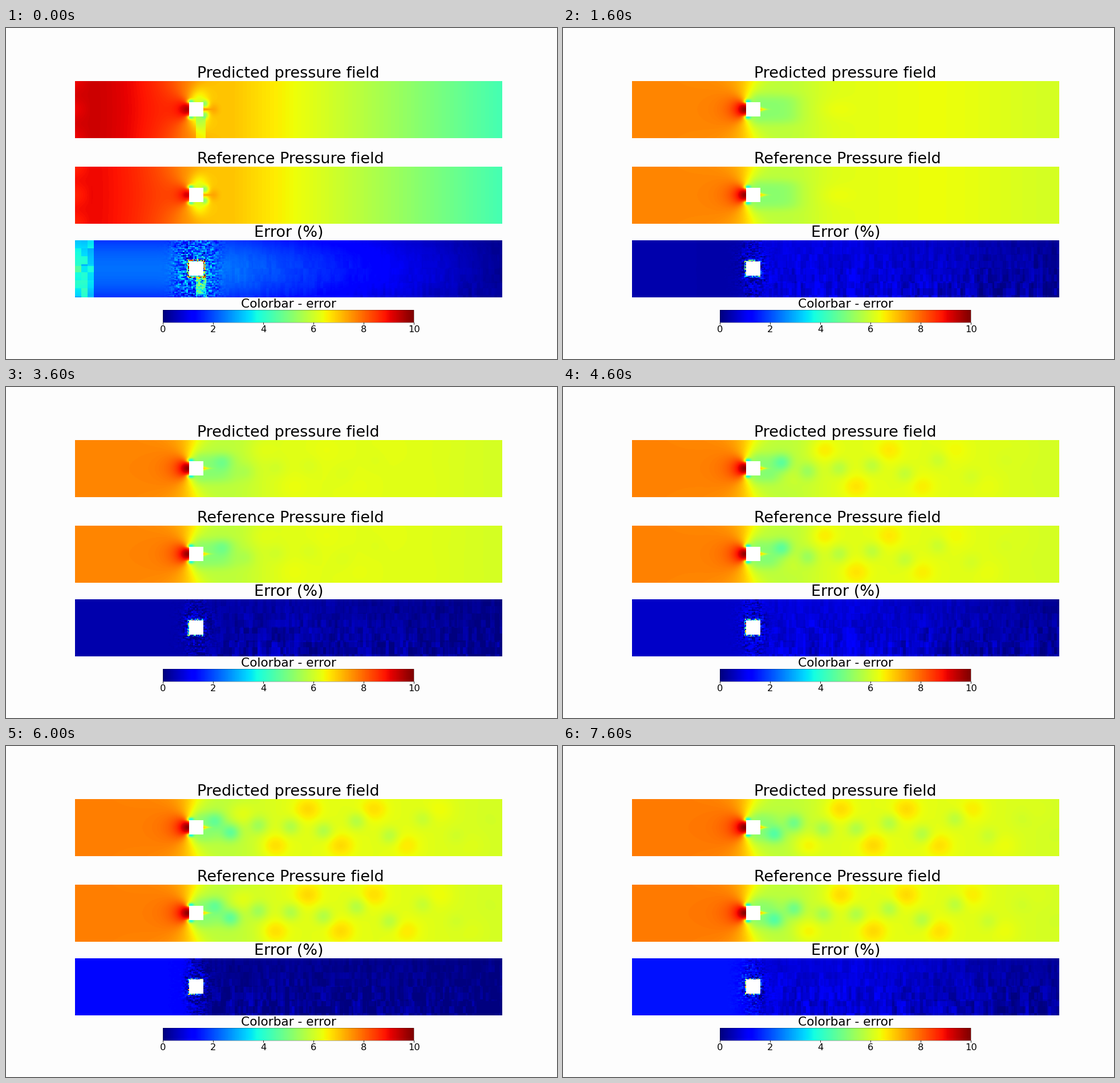
Recreate the animation shown at these times as a matplotlib script. Size 966 by 580 pixels, loop 8 s.

```python
import numpy as np
import matplotlib.pyplot as plt
from matplotlib.animation import FuncAnimation
from matplotlib.patches import Rectangle

W, H = 966, 580
LEFT, RIGHT, ROWS = 121, 870, 100
TOPS = (93, 243, 372)
STATES = 16
SPACING, STEP = 116, 63  # vortex spacing and drift per state

X, Y = np.meshgrid(np.arange(LEFT, RIGHT) + 0.5, np.arange(ROWS) + 0.5)
DY = Y - 49.5
D = abs(DY)
BOX = (X > 321) & (X < 346) & (D < 12.8)
WALL = np.maximum(abs(X - 333.5), D) - 12.5  # distance from the box


def sigmoid(z):
    return 1 / (1 + np.exp(-np.clip(z, -50, 50)))


def ramp(v, a, b):
    return np.clip((v - a) / (b - a), 0, 1)


def blob(x, dy, sx, sy):
    return np.exp(-((X - x) / sx) ** 2 - ((DY - dy) / sy) ** 2)


def startup(k):
    """Weight of the initial transient, gone after one state."""
    return np.exp(-4 * k)


def train(phase, k, first):
    """Positions of evenly spaced vortices drifting downstream."""
    return np.arange((phase + STEP * (k - 9) - first) % SPACING + first, 930, SPACING)


def shedding(k, x):
    """Vortex strength: grows with time, later further downstream."""
    return sigmoid(1.3 * (k - 7.4 - .35 * (x - 400) / STEP))


def vortices(k):
    out = np.zeros_like(X)
    for side in (-1, 1):
        # Low-pressure cores, held back while they form behind the box
        for x in train(629 - 29 * side, k, 305):
            xs = 360 + 30 * np.log1p(np.exp((x - 360) / 30))
            amp = .06 * sigmoid((740 - xs) / 40) + .05 * np.exp(-((xs - 390) / 25) ** 2)
            dy = side * np.clip((x - 485) * .085, -12, 15)
            out -= shedding(k, xs) * amp * ramp(x, 305, 330) * blob(xs, dy, 16, 15)
        # High-pressure saddles along the walls
        for x in train(485 + 29 * side, k, 395):
            amp = .055 * sigmoid((740 - x) / 50) * ramp(x, 385, 425)
            dy = side * min(32, 18 + (x - 405) * .7)
            out += shedding(k, x) * amp * blob(x, dy, 24, 21)
    return out


def pressure(k, predicted):
    start = startup(k)
    settled = 1 - start

    inlet = .765 + .013 * ((k - 3) / 12) ** 2 + start * (.165 if predicted else .135)
    drop = .012 + .11 * start
    up = inlet - drop * ramp(X, 150, 310) ** 1.6
    up -= start * .02 * ramp(X, 150, LEFT) * (1 + .5 * np.cos(DY / 8))

    decay = .70 - .268 * ramp(X, 400, RIGHT)
    steady = .575 + .05 * sigmoid((X - 440) / 20) - .02 * sigmoid((X - 790) / 30)
    surge = np.exp(-(k - 1) / 2) * np.exp(-((X - 455 - 65 * k) / 90) ** 2)
    down = start * decay + settled * (steady + .035 * surge)

    # Isolines fan out from the leading corners
    d = D - 12.5
    mid = 318 + np.where(d > 0, .27 * d, -3 * d)
    width = 6 + .6 * np.clip(d, 0, None)
    p = up + (down - up) * (.5 + .5 * np.tanh((X - mid) / width))

    # Stagnation on the front face, suction at its corners
    gap = np.clip(320 - X, 0, None)
    face = np.exp(-(DY / (11 + .45 * gap)) ** 2) / (1 + (gap / 17) ** 2)
    p += (.23 - .07 * start) * face * (X < 321)
    p -= .22 * np.exp(-(X - 324) ** 2 / 30 - (D - 14) ** 2 / 12)

    # Early flow round the box
    p -= start * .08 * np.exp(-((X - 338) / 16) ** 2 - (d / 22) ** 2)
    p -= start * .13 * np.exp(-((X - 349) / 6) ** 2 - ((D - 10) / 6) ** 2)
    p += start * .035 * blob(363, 0, 10, 10)
    if predicted:
        p -= start * .07 * ((X > 333) & (X < 350) & (DY > 12))

    # Wake bubble, the jet closing it, then the vortex street
    end = 410 - 35 * shedding(k, 400)
    wake = sigmoid((end - X) / 9) * sigmoid((X - 332) / 4) * np.exp(-(D / 25) ** 4)
    jet = np.exp(-.7 * (k - 1)) * blob(420 + 20 * k, 0, 30, 17)
    p += settled * (.06 * jet - .06 * wake + vortices(k))
    return np.ma.array(p, mask=BOX)


def cells(rng, cw, ch):
    """Centred uniform noise on cw by ch pixel cells."""
    rows, cols = X.shape
    grid = rng.random((-(-rows // ch), -(-cols // cw))) - .5
    return np.kron(grid, np.ones((ch, cw)))[:rows, :cols]


def error(k):
    rng = np.random.default_rng(40 + k)
    start = startup(k)

    # Inlet error creeps up, wake error pulses with the shedding
    inlet = .035 + .11 * sigmoid(k - 10)
    wake = .05 + .03 * np.cos(np.pi * (k - 9) / 3)
    level = inlet + (wake - inlet) * sigmoid((X - 325) / 10)
    kick = np.exp(-1.5 * (k - 1))
    level += kick * (.08 - .06 * np.exp(-((X - 310) / 35) ** 2))
    level *= 1 - .75 * ramp(X, 520, RIGHT)
    first = (.235 - .215 * ramp(X, 400, RIGHT)) * (1 - .25 * (DY / 50) ** 2)
    e = start * first + (1 - start) * level

    # Patchy inlet at first, streaks in the wake
    e += start * (X < 154) * (.11 + .05 * (DY > -5) + .12 * cells(rng, 11, 14))
    streak = (cells(rng, 8, 25) + cells(rng, 5, 12)) * (1 + DY / 80)
    e += .035 * streak * sigmoid((X - 350) / 12) * (1 - .7 * start)

    # Speckle around the box, hottest at its walls
    fine = cells(rng, 6, 2) + cells(rng, 3, 3)
    column = np.exp(-((X - 333) / (18 + 22 * start)) ** 4)
    e += fine * column * (.07 + .10 * start)
    e += .16 * fine * np.exp(-np.clip(WALL, 0, None) / 8)
    e += start * ((X > 333) & (X < 352) & (DY > 14)) * (.14 + .28 * cells(rng, 5, 19))
    hot = cells(rng, 2, 2) + .5
    e += (WALL < 2.5 + 2 * start) * (X < 346 + 6 * start) * (.65 + .2 * start) * hot ** 2
    return np.ma.array(np.clip(e, 0, 1), mask=BOX)


fields = [(pressure(k, True), pressure(k, False), error(k)) for k in range(STATES)]

fig = plt.figure(figsize=(W / 100, H / 100), dpi=100, facecolor="#fdfdfd")
ax = fig.add_axes([0, 0, 1, 1])
ax.axis("off")

cmap = plt.get_cmap("jet").copy()
cmap.set_bad("white")


def show(data, x0, x1, y0, y1):
    return ax.imshow(data, cmap=cmap, vmin=0, vmax=1, aspect="auto",
                     interpolation="nearest", extent=(x0, x1, y1, y0))


def label(x, y, text, px, ha="center"):
    ax.text(x, y, text, fontsize=px * .72, ha=ha, va="baseline",
            family="DejaVu Sans", color="black")


panels = [show(f, LEFT, RIGHT, top, top + ROWS) for f, top in zip(fields[0], TOPS)]
show(np.linspace(0, 1, 440)[None, :], 275, 715, 494, 516)
ax.add_patch(Rectangle((275, 494), 440, 22, fill=False, ec="black", lw=.5, alpha=.4))

label(335, 87, "Predicted pressure field", 27, "left")
label(335, 237, "Reference Pressure field", 27, "left")
label(495.3, 366, "Error (%)", 27)
label(495.3, 490, "Colorbar - error", 21.7)
for v in range(0, 11, 2):
    x = 275.3 + 44 * v
    ax.plot([x, x], [516, 519], color="black", lw=.6)
    label(x, 533, str(v), 16.3)

ax.set_xlim(0, W)
ax.set_ylim(H, 0)


def update(i):
    # States last three and two ticks in turn
    k = 2 * (i // 5) + (i % 5 >= 3)
    for panel, field in zip(panels, fields[k]):
        panel.set_data(field)
    return panels


anim = FuncAnimation(fig, update, frames=40, interval=200, repeat=True,
                     repeat_delay=0, blit=False)
plt.show()
```
